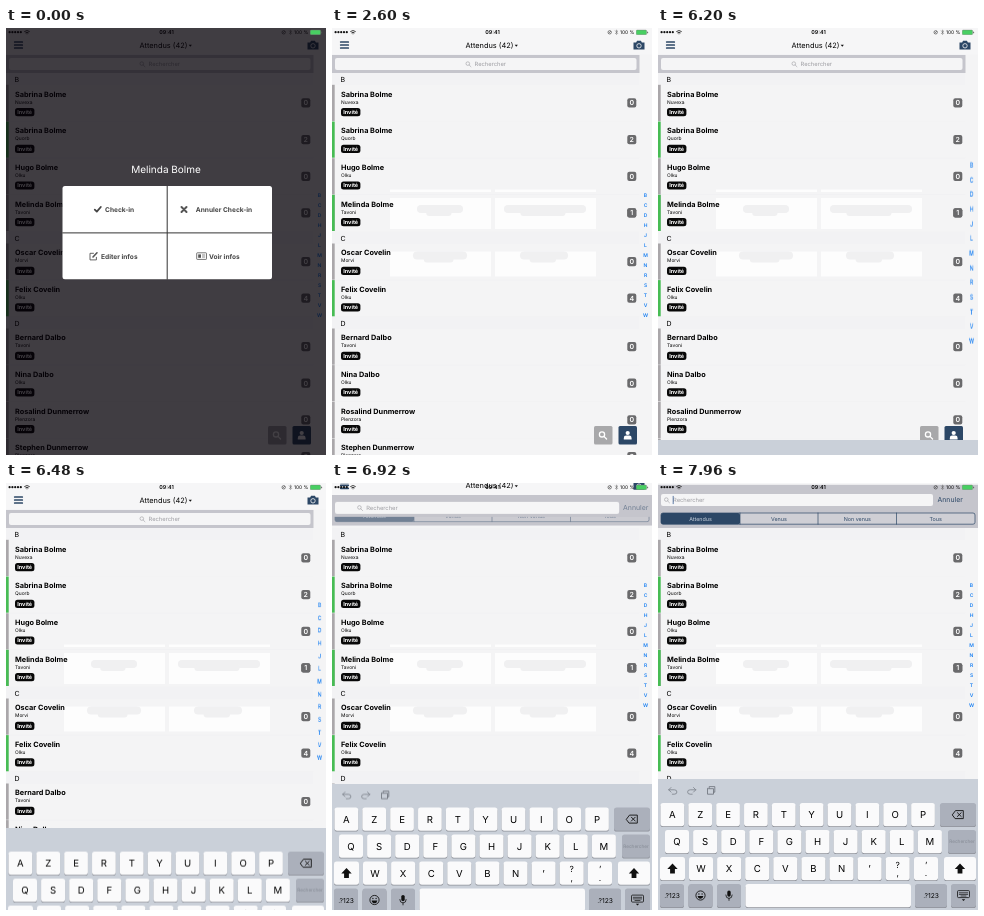
An HTML page for the animation above (8000 ms loop, 320 px wide and 427 px high).

```html
<!DOCTYPE html>
<html lang="fr">
<head>
<meta charset="utf-8">
<title>Attendus</title>
<style>
html, body { margin: 0; width: 100%; height: 100%; overflow: hidden; background: #f4f4f5; }
svg { display: block; width: 100%; height: 100%; }
text { font-family: Inter, "Open Sans", sans-serif; text-rendering: geometricPrecision; white-space: pre; }
.mid { text-anchor: middle; }
.bold { font-weight: 700; }
.semi { font-weight: 600; }
.line { fill: none; stroke-linecap: round; stroke-linejoin: round; }
</style>
</head>
<body>
<svg id="stage" viewBox="0 0 320 427"></svg>
<script>
const LOOP = 8000;
const NAVY = '#2c4766', GREEN = '#47bc54', GRAY = '#aaa7aa', BAR = '#c5c5cc', PAGE = '#f4f4f5';

const text = (x, y, s, size, attrs = '') =>
  `<text x="${x}" y="${y + size * .36}" font-size="${size}" ${attrs}>${s}</text>`;
const mid = (x, y, s, size, cls = '', attrs = '') => text(x, y, s, size, `class="mid ${cls}" ${attrs}`);
const rect = (x, y, w, h, fill, r = 0, attrs = '') =>
  `<rect x="${x}" y="${y}" width="${w}" height="${h}" rx="${r}" fill="${fill}" ${attrs}/>`;
const line = (d, color, width = .8) => `<path class="line" d="${d}" stroke="${color}" stroke-width="${width}"/>`;
const shape = (d, fill) => `<path d="${d}" fill="${fill}"/>`;
const circle = (x, y, r, fill, attrs = '') => `<circle cx="${x}" cy="${y}" r="${r}" fill="${fill}" ${attrs}/>`;
const group = (id, body, attrs = '') => `<g id="${id}" ${attrs}>${body}</g>`;
const lens = (x, y, r, color, width) =>
  circle(x, y, r, 'none', `stroke="${color}" stroke-width="${width}"`) +
  line(`M${x + r * .75} ${y + r * .75}l${r} ${r}`, color, width);

// ---- guest list
const guests = [
  [66, 'Sabrina Bolme', 'Nuvexa', 0],
  [102.7, 'Sabrina Bolme', 'Quorb', 2],
  [139.4, 'Hugo Bolme', 'Olku', 0],
  [176, 'Melinda Bolme', 'Tavoni', 0],
  [224.7, 'Oscar Covelin', 'Morvi', 0],
  [261.3, 'Felix Covelin', 'Olku', 4],
  [309.7, 'Bernard Dalbo', 'Tavoni', 0],
  [346.3, 'Nina Dalbo', 'Olku', 0],
  [383, 'Rosalind Dunmerrow', 'Plenzora', 0],
  [419.7, 'Stephen Dunmerrow', 'Plenzora', 0],
];
const status = (y, n) =>
  rect(0, y - 9.2, 2.7, 36.2, n ? GREEN : GRAY) +
  rect(295.3, y + 4.3, 9, 9.2, '#6a6a6c', 2) +
  mid(299.8, y + 8.9, n, 7, 'semi', 'fill="#fff"');
const guest = ([y, name, org, n]) =>
  line(`M3 ${y + 27.2}H307`, '#eeeef0', .5) + status(y, n) +
  text(9, y, name, 7.3, 'class="bold"') + text(9, y + 8, org, 4.9) +
  rect(9, y + 14, 19.4, 8.2, '#080808', 2.5) +
  mid(18.7, y + 18.1, 'Invité', 5.5, 'bold', 'fill="#fff"');
const section = (y, s) => rect(0, y - 6, 307, 12, '#f2f2f4') + text(8.5, y, s, 7);

// Pale trace of the closed dialog that stays behind the list
const trace = () => {
  const panel = (x, y, h) => rect(x, y, 101, h, '#fdfdfd');
  const smudge = (x, y, w) => rect(x, y, w, 8, '#f0f0f1', 4) + rect(x + w * .2, y + 4, w * .55, 7, '#f0f0f1', 3);
  return panel(58, 161.5, 2.5) + panel(163, 161.5, 2.5) + panel(58, 170, 31) + panel(163, 170, 31) +
    panel(58, 223.5, 25) + panel(163, 223.5, 25) +
    smudge(85, 177, 46) + smudge(172, 177, 82) + smudge(81, 223.5, 54) + smudge(188, 223.5, 48);
};

const list = rect(0, 0, 320, 427, PAGE) + section(51, 'B') + section(210, 'C') + section(295, 'D') +
  trace() + guests.map(guest).join('') + group('checked', status(176, 1));

const letters = group('index', [...'BCDHJLMNRSTVW'].map((c, i) =>
  mid(0, (i - 6) * 10, c, 5, 'semi', 'fill="#1b80f2"')).join(''));

const buttons =
  rect(262, 398, 18.5, 18.5, '#a8a8aa', 1.5) + lens(270, 406.4, 2.6, '#fff', 1.3) +
  rect(286.5, 398, 18.5, 18.5, NAVY, 1.5) + circle(295.7, 405, 2.1, '#fff') +
  shape('M291.8 411.5v-1.5q0-2.4 2.4-2.4h3q2.4 0 2.4 2.4v1.5z', '#fff');

// ---- header
const nav = group('nav',
  rect(0, -2, 320, 28.8, '#f6f6f7') +
  [14, 17, 20].map(y => line(`M8.7 ${y}h7.6`, NAVY, 1.7)).join('') +
  mid(157.5, 17.5, 'Attendus (42)', 7.4) + shape('M182.7 16.8h3.2l-1.6 2z', '#111') +
  shape('M301.5 14.5h2.6l1-1.8h3.8l1 1.8h2.6v7h-11z', NAVY) +
  circle(307, 17.8, 2.2, NAVY, 'stroke="#f6f6f7" stroke-width=".8"'));

const segments = group('segments',
  rect(3, 30, 314, 11.2, '#cfcfd5', 2, `stroke="${NAVY}" stroke-width=".7"`) +
  rect(3, 30, 79, 11.2, NAVY, 2) +
  line('M82 30v11.2M160 30v11.2M238.5 30v11.2', NAVY, .7) +
  ['Attendus', 'Venus', 'Non venus', 'Tous'].map((s, i) =>
    mid(42.5 + i * 78.4, 35.7, s, 5.4, '', `fill="${i ? NAVY : '#c9d2dd'}"`)).join(''));
const scopes = group('scopes', group('backdrop', rect(0, -10, 320, 55, BAR)) + segments);

const search = group('search',
  rect(0, 26.8, 307.5, 18.2, BAR, 0, 'id="bar"') +
  rect(3, 30, 301.5, 12, '#f5f5f6', 2, 'id="field"') +
  group('hint', lens(135.8, 35.6, 1.8, '#9c9ca1', .6) + text(142.5, 36, 'Rechercher', 5.8, 'fill="#9c9ca1"')) +
  group('caret', line('M15.2 32.3v7.4', '#3b5f92', .8)) +
  group('cancel', text(279.5, 36, 'Annuler', 6.9, `fill="${NAVY}"`)));

const statusBar =
  [0, 1, 2, 3, 4].map(i => circle(3.6 + i * 2.8, 4.2, 1.1, '#111')).join('') +
  line('M18.6 3.4q2.4-2 4.8 0M19.7 4.7q1.3-1 2.6 0', '#111', .8) + circle(21, 5.8, .5, '#111') +
  mid(160.5, 4.3, '09:41', 5.4, 'semi') +
  circle(277.7, 4.3, 1.7, 'none', 'stroke="#333" stroke-width=".6"') + line('M277 5l1.4-1.5', '#333', .6) +
  line('M283.3 2.8l2.4 2.6-1.2 1.1v-4.5l1.2 1.1-2.4 2.6', '#555', .45) +
  text(288, 4.3, '100 %', 4.9);
const battery =
  rect(304.2, 2.1, 10.4, 4.6, '#48cf62', 1, 'stroke="#777" stroke-width=".4"') + rect(315.2, 3.5, .9, 1.8, '#555', .4);

// ---- keyboard, drawn from its own top edge
const KEY = '#fafafb', DARK = '#abb0bb', INK = '#111';
const key = (x, row, w, fill = KEY) => {
  const y = 24 + row * 27;
  return rect(x, y + .9, w, 23.2, '#8e9199', 2.6) + rect(x, y, w, 23.2, fill, 2.6);
};
const rowOf = (chars, x, row, pitch, w) => chars.map((c, i) =>
  key(x + i * pitch, row, w) + mid(x + i * pitch + w / 2, 35.8 + row * 27, c, 9.6)).join('');
const twoKey = (x, top, bottom) =>
  key(x, 2, 24) + mid(x + 12, 85.5, top, 8.5) + mid(x + 12, 94, bottom, 8.5);
const shift = x => shape(`M${x} 84.6l5.2 5.3h-2.8v4.7h-4.8v-4.7h-2.8z`, INK);
const undo = 'M13 8.5l-2.3 2.3 2.3 2.3M10.7 10.8h5.6q2.6 0 2.6 2.2t-2.6 2.2h-2';
const keyboard = group('keyboard',
  rect(0, 0, 320, 140, '#cad0d9') +
  group('tools', line(undo, '#7b808a') +
    `<g transform="translate(48.5 0) scale(-1 1)">${line(undo, '#7b808a')}</g>` +
    line('M51 9.7h4.5v5.5h-6v-5.5zM51.2 9.2v-1.6h5.6v5.6h-1.2', '#6b7079')) +
  rowOf([...'AZERTYUIOP'], 2.5, 0, 27.85, 23.7) + key(282, 0, 36, DARK) +
  line('M294.5 35.6l3-4h7.8v8h-7.8zM299.4 33.7l3.8 3.8m0-3.8l-3.8 3.8', INK, .9) +
  rowOf([...'QSDFGHJKLM'], 7, 1, 28.1, 24) + key(290, 1, 28, DARK) +
  mid(304, 62.8, 'Rechercher', 4.7, '', 'fill="#858a94"') +
  key(2, 2, 25) + shift(14.5) + rowOf([...'WXCVBN’'], 31, 2, 28.1, 24) +
  twoKey(227.7, '?', ',') + twoKey(256, '’', '.') + key(286, 2, 32) + shift(302) +
  key(2, 3, 24, DARK) + mid(14, 116.8, '.?123', 6.7) +
  key(30.5, 3, 24, DARK) + circle(42.5, 116.5, 4.6, 'none', `stroke="${INK}" stroke-width=".9"`) +
  circle(40.9, 115, .65, INK) + circle(44.1, 115, .65, INK) + shape('M39.6 117h5.8q-.5 2.8-2.9 2.8t-2.9-2.8z', INK) +
  key(59, 3, 24, DARK) + rect(69.3, 111.4, 3.4, 6.4, INK, 1.7) +
  line('M67.8 116q0 3.4 3.2 3.4t3.2-3.4M71 119.4v2', INK, .8) +
  key(87.5, 3, 165.5) + key(257, 3, 32, DARK) + mid(273, 116.8, '.?123', 6.7) +
  key(293, 3, 25, DARK) + rect(299.5, 111.6, 12, 7, 'none', 1, `stroke="${INK}" stroke-width=".8"`) +
  line('M301.3 113.8h8.4M301.3 115.4h8.4M303 117h5', INK, .7) + shape('M303.8 120.2h3.4l-1.7 1.9z', INK));

// ---- check-in dialog
const ICON = '#555';
const label = (x, y, s) => text(x, y, s, 6.6, 'class="bold" fill="#444"');
const dialog = group('dialog',
  rect(0, 0, 320, 427, '#07030a', 0, 'opacity=".76"') +
  mid(160, 141, 'Melinda Bolme', 10, '', 'fill="#fff"') +
  rect(56.5, 158, 209.5, 93.3, '#fff', 2.5) +
  line('M161.2 158.2v93M56.7 204.9h209', '#333', 1) +
  line('M88.8 181.6l2 2 4-4.6', '#444', 1.8) + label(99, 181.5, 'Check-in') +
  line('M175.5 179l5 5m0-5l-5 5', ICON, 2) + label(189.8, 181.5, 'Annuler Check-in') +
  line('M87.5 225.3h-3.5v6.6h6.4v-2.6', ICON, .9) + line('M87 229l4-4.2', ICON, 1.6) + label(95, 228.2, 'Editer infos') +
  rect(190.7, 224.8, 9.8, 6.6, '#fff', .6, `stroke="${ICON}" stroke-width=".8"`) +
  rect(192.2, 226.4, 2.8, 3.4, ICON) + line('M196.4 227h2.4M196.4 229h2.4', ICON, .7) +
  label(203, 228.2, 'Voir infos'));

document.getElementById('stage').innerHTML =
  list + letters + buttons + scopes + search + nav + statusBar + keyboard + dialog + battery;

// ---- motion: each step is [ms, value, easing to the next step]
const play = (id, prop, steps, format = v => v) => {
  const all = [[0, steps[0][1]], ...steps, [LOOP, steps.at(-1)[1]]];
  document.getElementById(id).animate(
    all.map(([t, v, easing = 'linear']) => ({ offset: t / LOOP, [prop]: format(v), easing })),
    { duration: LOOP, iterations: Infinity });
};
const shiftX = v => `translate(${v}px, 0px)`;
const shiftY = v => `translate(0px, ${v}px)`;
const px = v => `${v}px`;
const SMOOTH = 'cubic-bezier(.4, 0, .6, 1)';

play('dialog', 'opacity', [[40, 1, 'ease-out'], [760, 0]]);
play('checked', 'opacity', [[1280, 0], [1280, 1]]);

const rise = Array.from({ length: 30 }, (_, i) => [6320 + i * 40, 296 + 116 * Math.exp(-i * 40 / 185)]);
play('keyboard', 'transform', [[6200, 430], [6200, 412], ...rise, [7520, 296]], shiftY);
play('tools', 'opacity', [[6500, 0], [6800, 1]]);

play('index', 'transform', [
  [6200, [227, 1]], [6200, [225, 1.467]], [6320, [225, 1.467]],
  [6480, [198.5, 1.275], 'ease-out'], [6840, [162, 1]],
], ([y, s]) => `translate(313.5px, ${y}px) scale(1, ${s})`);

play('backdrop', 'opacity', [[6680, 0], [6800, 1]]);
play('scopes', 'transform', [[6700, -6, SMOOTH], [7100, 0]], shiftY);
play('segments', 'opacity', [[6700, 0], [6920, .55], [7100, 1]]);
play('nav', 'transform', [[6700, 0, SMOOTH], [7100, -25]], shiftY);
play('search', 'transform', [[6700, 0, SMOOTH], [7100, -19]], shiftY);
play('bar', 'width', [[6700, 307.5], [6800, 320]], px);
play('field', 'width', [[6700, 301.5, SMOOTH], [7100, 272]], px);
play('hint', 'transform', [[6700, 0, SMOOTH], [7000, -127.5]], shiftX);
play('cancel', 'transform', [[6700, 28, SMOOTH], [7100, 0]], shiftX);
play('cancel', 'opacity', [[6700, 0], [7100, 1]]);
play('caret', 'opacity', [[7040, 0], [7040, 1]]);
</script>
</body>
</html>
```
